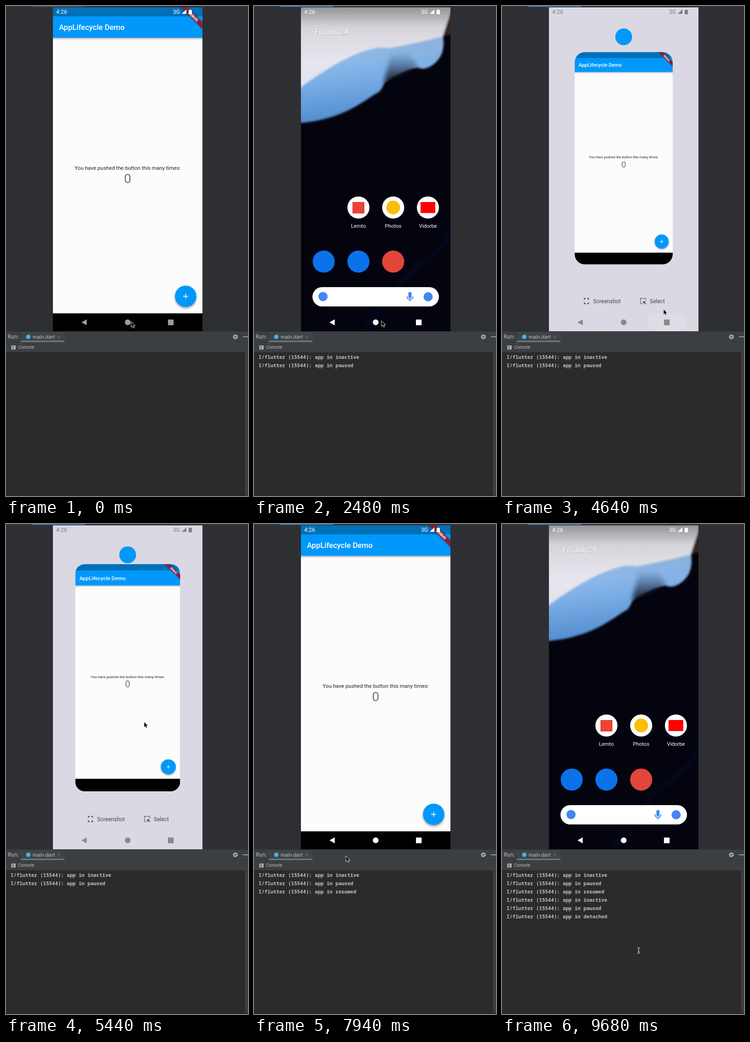
An HTML page for the animation above (9.77 s loop, 526 by 1065 pixels).

```html
<!DOCTYPE html>
<html lang="en">
<head>
<meta charset="utf-8">
<title>App lifecycle</title>
<style>
html, body { margin: 0; width: 100%; height: 100%; overflow: hidden; background: #2b2b2b; }
svg { display: block; width: 100vw; height: 100vh; }
text { font-family: Roboto, sans-serif; white-space: pre; }
.ide text { font-family: Inter, sans-serif; fill: #bfc1c3; }
#log text { font: 600 10.73px "Noto Sans Mono", monospace; fill: #bfc1c3; }
.mid { text-anchor: middle; }
</style>
</head>
<body>
<svg viewBox="0 0 526 1065" preserveAspectRatio="none">
<defs>
  <clipPath id="phoneClip"><rect x="102" y="3" width="325" height="704"/></clipPath>
  <clipPath id="appClip"><rect id="appEdge" x="102" y="3" width="325" height="704"/></clipPath>
  <filter id="soft" x="-20%" y="-20%" width="140%" height="140%"><feGaussianBlur stdDeviation="2.2"/></filter>
  <filter id="smear" x="-50%" y="-50%" width="200%" height="200%"><feGaussianBlur stdDeviation="5"/></filter>
  <filter id="drop" x="-30%" y="-30%" width="160%" height="160%"><feGaussianBlur stdDeviation="2.4"/></filter>
  <linearGradient id="shade" x2="0" y2="1"><stop stop-color="#000" stop-opacity=".36"/><stop offset=".35" stop-color="#000" stop-opacity=".1"/><stop offset="1" stop-color="#000" stop-opacity="0"/></linearGradient>
  <linearGradient id="barShade" x2="0" y2="1"><stop stop-color="#000" stop-opacity=".3"/><stop offset="1" stop-color="#000" stop-opacity="0"/></linearGradient>
  <linearGradient id="pale" x2="0" y2="1"><stop stop-color="#e6e6ea"/><stop offset=".4" stop-color="#edebf2"/><stop offset="1" stop-color="#dedfee"/></linearGradient>
  <linearGradient id="blue" gradientUnits="userSpaceOnUse" x1="215" y1="85" x2="235" y2="245"><stop stop-color="#9cc1ed"/><stop offset=".45" stop-color="#7aade5"/><stop offset="1" stop-color="#4f8ccf"/></linearGradient>
  <linearGradient id="dusk" x2="0" y2="1"><stop stop-color="#16213a" stop-opacity="0"/><stop offset=".9" stop-color="#070814"/></linearGradient>
</defs>

<rect width="526" height="1065" fill="#2e2f33"/>
<rect width="526" height="2" fill="#34373b"/>
<rect id="tabLine" x="57" width="116" height="2"/>

<g clip-path="url(#phoneClip)">
  <rect x="102" y="3" width="325" height="704" fill="#04040f"/>
  <g id="wall">
    <g filter="url(#soft)">
      <path d="M80-20H440C428 20 420 40 411 68L280 96C210 106 160 150 80 196Z" fill="url(#pale)"/>
      <path d="M80 192C140 148 190 114 240 98C262 91 275 88 290 92C330 86 370 76 411 66C413 84 412 96 406 108C396 127 376 138 363 136C350 130 330 141 308 151C292 158 286 163 281 172C276 186 268 189 262 192C230 214 205 229 178 238C150 247 125 254 80 255Z" fill="url(#blue)"/>
      <path d="M430 8Q419 38 411 64L430 62Z" fill="#3a2a22"/>
    </g>
    <path d="M282 168L298 102H336L356 132L330 150Z" fill="url(#dusk)" opacity=".8" filter="url(#smear)"/>
    <path d="M240 706Q310 600 370 555T427 478" fill="none" stroke="#10124a" stroke-width="9" opacity=".3" filter="url(#smear)"/>
    <g fill="#333a58"><circle cx="181" cy="372" r=".7"/><circle cx="152" cy="460" r=".7"/><circle cx="372" cy="520" r=".7"/><circle cx="118" cy="661" r=".7"/></g>
  </g>
  <rect id="topShade" x="102" y="3" width="325" height="120" fill="url(#shade)"/>

  <g id="home">
    <g font-size="15.6">
      <text x="133.4" y="62.8" fill="#000" opacity=".28">Fri, Jun 24</text>
      <text x="133" y="62" fill="#fff">Fri, Jun 24</text>
    </g>
    <g fill="#fff"><circle cx="227" cy="438" r="24"/><circle cx="302.5" cy="438" r="24"/><circle cx="378" cy="438" r="24"/></g>
    <rect x="214" y="426" width="26" height="25" fill="#ea4335"/>
    <circle cx="302.5" cy="438" r="15" fill="#fbbc04"/>
    <rect x="362" y="426" width="32" height="24" fill="#f00"/>
    <g class="mid" font-size="11.4" fill="#fff">
      <text x="227" y="482">Lemto</text><text x="302.5" y="482">Photos</text><text x="378" y="482">Vidorbe</text>
    </g>
    <g fill="#0b72ea"><circle cx="151.5" cy="555.5" r="24"/><circle cx="227" cy="555.5" r="24"/></g>
    <circle cx="302.5" cy="555.5" r="24" fill="#e2463a"/>
    <rect x="127" y="611" width="275" height="42" rx="21" fill="#fff"/>
    <circle cx="150" cy="631.5" r="10" fill="#4285f4"/>
    <g stroke="#4285f4" fill="none">
      <path d="M339 625V632" stroke-width="7" stroke-linecap="round"/>
      <path d="M332.5 631Q333 638 339 638T345.5 631M339 638V642" stroke-width="2"/>
    </g>
    <circle cx="378.5" cy="632" r="10" fill="#4285f4"/>
  </g>

  <g id="recents">
    <rect x="102" y="3" width="325" height="704" fill="#dad8e2"/>
    <circle cx="264.5" cy="67" r="18.3" fill="#0098fa"/>
    <g font-size="12" fill="#47474d">
      <text x="198" y="645.5">Screenshot</text><text x="321" y="645.5">Select</text>
    </g>
    <g fill="none" stroke="#36363c" stroke-width="1.5">
      <path d="M179 638.5V635.5H182M185 635.5H188V638.5M188 644V647H185M182 647H179V644"/>
      <path d="M301 635.5H312.5V640M301 635.5V647H306" stroke-dasharray="2 1.3"/>
      <path d="M313 648L307.5 642.5M307.5 646.5V642.5H311.5"/>
    </g>
  </g>

  <rect id="backdrop" x="102" y="3" width="325" height="704"/>
  <g id="app"><g clip-path="url(#appClip)">
    <rect x="102" y="3" width="325" height="704" fill="#fcfcfc"/>
    <rect x="102" y="69" width="325" height="5" fill="url(#barShade)"/>
    <rect x="102" y="3" width="325" height="66" fill="#0098fa"/>
    <rect x="102" y="3" width="325" height="19.5" fill="#0070b8"/>
    <text x="115" y="52" font-size="16.55" font-weight="500" fill="#fff">AppLifecycle Demo</text>
    <g class="mid">
      <text x="264.5" y="355.7" font-size="11.59" fill="#212121">You have pushed the button this many times:</text>
      <text x="264.3" y="385" font-size="28.1" fill="#757575">0</text>
    </g>
    <circle cx="390.5" cy="634" r="23" fill="#000" opacity=".38" filter="url(#drop)"/>
    <circle cx="390.5" cy="631" r="23.3" fill="#0098fa"/>
    <path d="M385 631H396M390.5 625.5V636.5" stroke="#fff" stroke-width="1.6"/>
    <g transform="translate(427 3) rotate(45)">
      <rect x="-40" y="23.2" width="80" height="9.9" fill="#000" opacity=".35" filter="url(#drop)"/>
      <rect x="-40" y="23.2" width="80" height="9.9" fill="#8d1d33"/>
      <text class="mid" y="31.1" font-size="8.3" font-weight="900" fill="#fff">DEBUG</text>
    </g>
    <rect x="102" y="668" width="325" height="39"/>
  </g></g>

  <g id="status">
    <text x="109" y="17" font-size="12.4">4:26</text>
    <text x="363" y="17" font-size="12.2">3G</text>
    <path d="M392 7.5V17H382ZM397 9H399V7.7H402V9H404V18H397Z"/>
  </g>
  <rect id="pill" y="668" height="39" rx="19.5" fill="#fff"/>
  <g id="nav">
    <path d="M164 687.5L175.5 681V694Z"/><circle cx="264.5" cy="687.5" r="6.2"/><rect x="352" y="681.5" width="12.3" height="12.3"/>
  </g>
</g>

<g class="ide">
  <rect y="708" width="526" height="45" fill="#3c3f41"/>
  <path d="M0 707.5H526M0 730H526M0 752.7H526" stroke="#313437"/>
  <rect x="32" y="709" width="95" height="21" fill="#404446"/>
  <rect x="32" y="727.5" width="95" height="2.8" fill="#757d84"/>
  <circle cx="48.5" cy="719" r="4.8" fill="#40b6e8"/>
  <text x="4" y="723" font-size="11.1">Run:</text>
  <text x="58" y="723" font-size="10.9">main.dart</text>
  <path d="M112 717L117.5 722.5M117.5 717L112 722.5" stroke="#74787a"/>
  <g fill="none" stroke="#afb1b3">
    <circle cx="498.5" cy="719" r="3.1" stroke-width="2.4"/>
    <circle cx="498.5" cy="719" r="4.8" stroke-width="1.6" stroke-dasharray="2.4 2.63"/>
    <path d="M515 719H526" stroke-width="1.6"/>
  </g>
  <rect x="11.5" y="738" width="9.5" height="8.5" fill="#afb1b3"/>
  <path d="M14 739.8L17 742.2L14 744.6" fill="none" stroke="#3c3f41" stroke-width="1.3"/>
  <text x="26" y="745.4" font-size="9.2">Console</text>
  <rect y="753" width="526" height="312" fill="#2b2b2b"/>
  <rect x="518" y="753" width="8" height="312" fill="#3a3c3e"/>
  <path d="M518.5 753V1065" stroke="#232425"/>
  <path d="M0 1064.5H526" stroke="#232425"/>
</g>
<g id="log"></g>

<g id="cursor">
  <path d="M0 0V12.3L2.8 9.7L4.8 14L7 13L5.1 8.9H8.9Z" fill="#000" stroke="#fff" stroke-width=".9"/>
  <g fill="none" stroke-linecap="square">
    <path id="resize" d="M-4.5-1H4.5M-4.5 1.4H4.5M0-4V4.5M-2-3L0-5L2-3M-2 3.5L0 5.5L2 3.5"/>
    <path id="beam" d="M-2.5-6Q0-6 0-4.5Q0-6 2.5-6M0-4.5V4.5M-2.5 6Q0 6 0 4.5Q0 6 2.5 6M-1.3 2H1.3"/>
  </g>
</g>
</svg>

<script>
const LOOP = 9770, FOCUS = 980, HOME = 1235, RECENTS = 4410, OPEN = 5400, OPENED = 5736, BACK = 8742;
const CARD = 213 / 325, CARD_MID = 331;
const $ = id => document.getElementById(id);
const set = (el, attrs) => { for (const k in attrs) el.setAttribute(k, attrs[k]); };
const clamp = v => Math.max(0, Math.min(1, v));
const span = (t, from, to) => clamp((t - from) / (to - from));
const smooth = p => p * p * (3 - 2 * p);
const out = (p, n) => 1 - (1 - p) ** n;
const mix = (a, b, p) => a + (b - a) * p;
const zoom = (k, cy) => `translate(264.5 ${cy}) scale(${k}) translate(-264.5 ${-cy})`;

const log = [
  [1340, 'inactive'], [1800, 'paused'], [5600, 'resumed'],
  [8840, 'inactive'], [9300, 'paused'], [9340, 'detached']
].map(([at, state], i) => {
  const el = document.createElementNS('http://www.w3.org/2000/svg', 'text');
  set(el, { x: 10, y: 766.6 + i * 18.1 });
  el.textContent = `I/flutter (15544): app in ${state}`;
  $('log').append(el);
  return { at, el };
});

// time, x, y
const track = [
  [0, 272, 686], [2300, 272, 686], [2480, 277, 684], [3480, 277, 684], [4100, 355, 685],
  [4450, 355, 685], [4640, 351, 659], [5080, 300, 430], [5500, 300, 430], [6080, 291, 842],
  [6440, 291, 842], [6760, 289.5, 813], [7400, 271, 796], [8280, 170, 690], [8660, 170, 690],
  [8800, 176, 706], [9250, 285, 890], [9560, 297, 927], [LOOP, 297, 927]
];
// start, fade start, fade end, centre, width
const taps = [[1120, 1400, 1750, 264.5, 88], [RECENTS - 110, 4500, 4900, 358, 84], [8645, 8920, 9270, 171, 83]];
const [arrow, lines] = $('cursor').children;

const slope = (i, c) => (track[i + 1][c] - track[i][c]) / (track[i + 1][0] - track[i][0]);
// Speed at a point: zero at rests and turns, else the harmonic mean of both sides
function speed(i, c) {
  if (i === 0 || i === track.length - 1) return 0;
  const a = slope(i - 1, c), b = slope(i, c);
  return a * b > 0 ? 2 * a * b / (a + b) : 0;
}
function along(t, c) {
  const j = track.findIndex(k => k[0] > t), i = j - 1;
  const d = track[j][0] - track[i][0], p = (t - track[i][0]) / d, q = 1 - p;
  return mix(track[i][c], track[j][c], smooth(p)) + d * p * q * (q * speed(i, c) - p * speed(j, c));
}

function drawCursor(t) {
  const x = along(t, 1), y = along(t, 2);
  const kind = y > 753 ? 'beam' : y > 703 && y < 712 ? 'resize' : 'arrow';
  set($('cursor'), { transform: `translate(${x} ${y})` });
  set(arrow, { visibility: kind === 'arrow' ? 'visible' : 'hidden' });
  for (const id of ['resize', 'beam']) set($(id), { visibility: kind === id ? 'visible' : 'hidden' });
  set(lines, { stroke: kind === 'beam' ? '#e4e4e4' : '#111', 'stroke-width': kind === 'beam' ? 1.1 : 1.4 });
}

function drawApp(t) {
  const leave = t >= BACK ? BACK : HOME;
  const inRecents = t >= RECENTS && t < OPENED;
  const enter = span(t, RECENTS, RECENTS + 220);
  let x = 0, y = 0, s = 1, alpha = 1, rx = 0;
  if (inRecents) {
    const grow = smooth(out(span(t, OPEN, OPENED), 2));
    const k = mix(1.33, 1, out(enter, 3));
    s = mix(CARD * k, 1, grow);
    x = 264.5 * (1 - s);
    y = mix(CARD_MID, 355, grow) - 355 * s;
    rx = mix(34, 0, grow);
    alpha = enter;
  } else if (t < RECENTS || t >= BACK) {
    y = 95 * out(span(t, leave, leave + 250), 3.4);
    alpha = 1 - span(t, leave + 25, leave + 150);
  }
  set($('app'), { transform: `translate(${x} ${y}) scale(${s})`, opacity: alpha });
  set($('appEdge'), { rx });
  set($('backdrop'), { transform: `translate(0 ${y})`, opacity: inRecents ? 0 : alpha });

  const veil = inRecents ? smooth(enter) : 0;
  const reveal = out(span(t, leave, leave + 350), 3.15);
  set($('home'), {
    transform: zoom(mix(.9, 1, reveal) - .08 * veil, 358),
    opacity: span(t, leave, leave + 100) * (1 - veil)
  });
  set($('topShade'), { opacity: span(t, leave, leave + 350) });
  set($('wall'), { transform: zoom(mix(1.035, 1, smooth(span(t, leave, leave + 500))), 180) });
  drawSystem(t, veil);
}

function drawSystem(t, veil) {
  set($('recents'), { opacity: veil });
  const onLight = veil > .5 && t < OPENED - 150;
  set($('status'), { fill: onLight ? '#7d7c82' : '#fff' });
  set($('nav'), { fill: onLight ? '#89888f' : t < FOCUS ? '#9b9b9b' : '#fff' });
  set($('tabLine'), { fill: t < FOCUS ? '#4b5157' : '#2f7fb8' });

  const tap = taps.find(([from, , to]) => t >= from && t < to);
  if (tap) {
    const [from, , , cx, full] = tap;
    const w = full * mix(.6, 1, out(span(t, from, from + 120), 2));
    set($('pill'), { x: cx - w / 2, width: w });
  }
  const glow = tap ? .17 * span(t, tap[0], tap[0] + 80) * (1 - span(t, tap[1], tap[2])) : 0;
  set($('pill'), { opacity: glow });
}

function draw(t) {
  drawApp(t);
  drawCursor(t);
  for (const { at, el } of log) set(el, { visibility: t >= at ? 'visible' : 'hidden' });
}

const start = performance.now();
function tick() {
  draw((performance.now() - start) % LOOP);
  requestAnimationFrame(tick);
}
tick();
</script>
</body>
</html>
```
